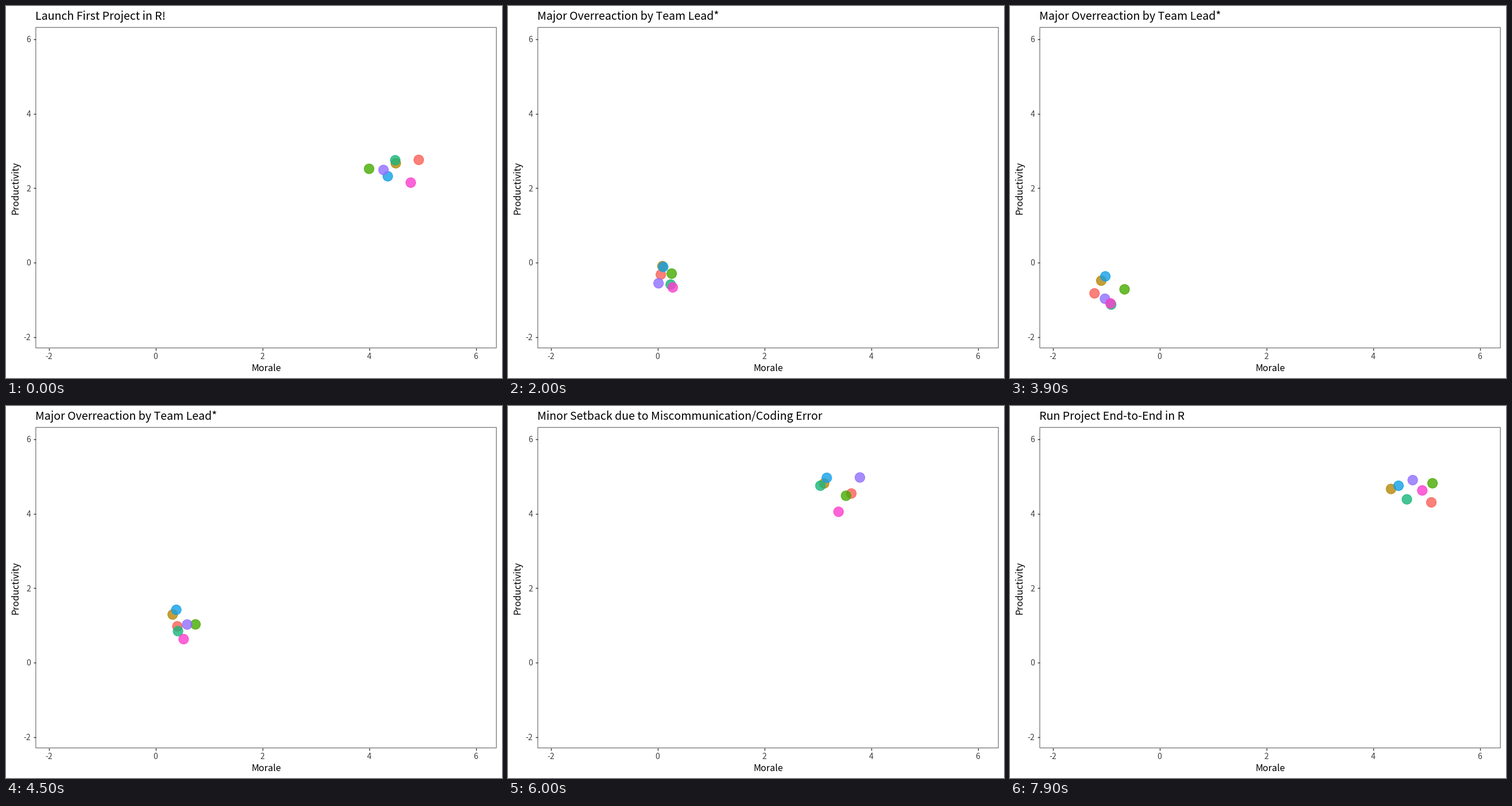
A matplotlib script for the animation above (8 s loop, 864 by 648 pixels).

```python
import numpy as np
import matplotlib.pyplot as plt
from matplotlib.animation import FuncAnimation
from matplotlib.patches import Circle, Rectangle

W, H, DPI = 864, 648, 100
PX = 72 / DPI  # points per pixel
FRAMES, INTERVAL = 80, 100
MOVES = [(2, 30), (33, 60), (63, 90)]  # first and last frame of each move

TITLES = ["Launch First Project in R!",
          "Major Overreaction by Team Lead*",
          "Minor Setback due to Miscommunication/Coding Error",
          "Run Project End-to-End in R"]

# Each dot's key points, as morale + productivity * j, one per title
TEAM = {
    "#f96058": (4.93 + 2.76j, -1.86 - 1.53j, 3.63 + 4.54j, 5.90 + 4.17j),
    "#b68605": (4.50 + 2.67j, -1.65 - 1.18j, 3.12 + 4.81j, 5.01 + 4.58j),
    "#46aa00": (4.00 + 2.52j, -1.21 - 1.40j, 3.53 + 4.48j, 5.99 + 5.00j),
    "#18b67c": (4.49 + 2.75j, -1.43 - 1.90j, 3.05 + 4.75j, 5.51 + 4.18j),
    "#129fe7": (4.35 + 2.32j, -1.57 - 1.07j, 3.17 + 4.96j, 5.20 + 4.63j),
    "#906eff": (4.27 + 2.49j, -1.66 - 1.75j, 3.79 + 4.97j, 5.27 + 4.86j),
    "#fc3dcd": (4.78 + 2.15j, -1.49 - 1.77j, 3.39 + 4.05j, 5.77 + 4.94j),
}

plt.rcParams["font.family"] = "Noto Sans CJK JP"
fig = plt.figure(figsize=(W / DPI, H / DPI), dpi=DPI, facecolor="white")
ax = fig.add_axes([0, 0, 1, 1])
ax.set_xlim(0, W)
ax.set_ylim(H, 0)
ax.axis("off")


def to_pixels(point):
    return 260.5 + 93 * point.real, 447.3 - 64.95 * point.imag


def label(x, y, text, size, color="black", **kw):
    kw = {"ha": "center", "va": "baseline", **kw}
    return ax.text(x, y, text, fontsize=size * PX, color=color, **kw)


def tick(xs, ys):
    ax.plot(xs, ys, color="#333333", lw=1.4 * PX, solid_capstyle="butt")


ax.add_patch(Rectangle((51.9, 37.3), 802.3, 558.3, fill=False, snap=False,
                       ec="#606060", lw=1.1 * PX))
for value in range(-2, 7, 2):
    x, y = to_pixels(complex(value, value))
    tick([x, x], [596, 600])
    tick([48, 52], [y, y])
    label(x, 615, str(value), 14, "#404040")
    label(43, y + 5.2, str(value), 14, "#404040", ha="right")
label(453.3, 635.7, "Morale", 16.1)
label(21.3, 316.5, "Productivity", 16.1, rotation=90, rotation_mode="anchor")
title = label(50.8, 24.3, TITLES[0], 19.6, ha="left")

keys = np.array(list(TEAM.values())).T
dots = [ax.add_patch(Circle((0, 0), 8.5, fc=c, ec=c, alpha=0.8, lw=1.2 * PX))
        for c in TEAM]


def progress(frame):
    """Sum of the moves made so far, each one running from 0 to 1."""
    return sum(np.clip((frame - start) / (end - start), 0, 1)
               for start, end in MOVES)


def draw(frame):
    done = progress(frame)
    stage = int(done)
    ease = (1 - np.cos(np.pi * (done - stage))) / 2
    points = keys[stage] + (keys[stage + 1] - keys[stage]) * ease
    for dot, point in zip(dots, points):
        dot.center = to_pixels(point)
    title.set_text(TITLES[int(done + 0.5)])
    return [*dots, title]


anim = FuncAnimation(fig, draw, frames=FRAMES, interval=INTERVAL,
                     repeat=True, repeat_delay=0)
plt.show()
```
